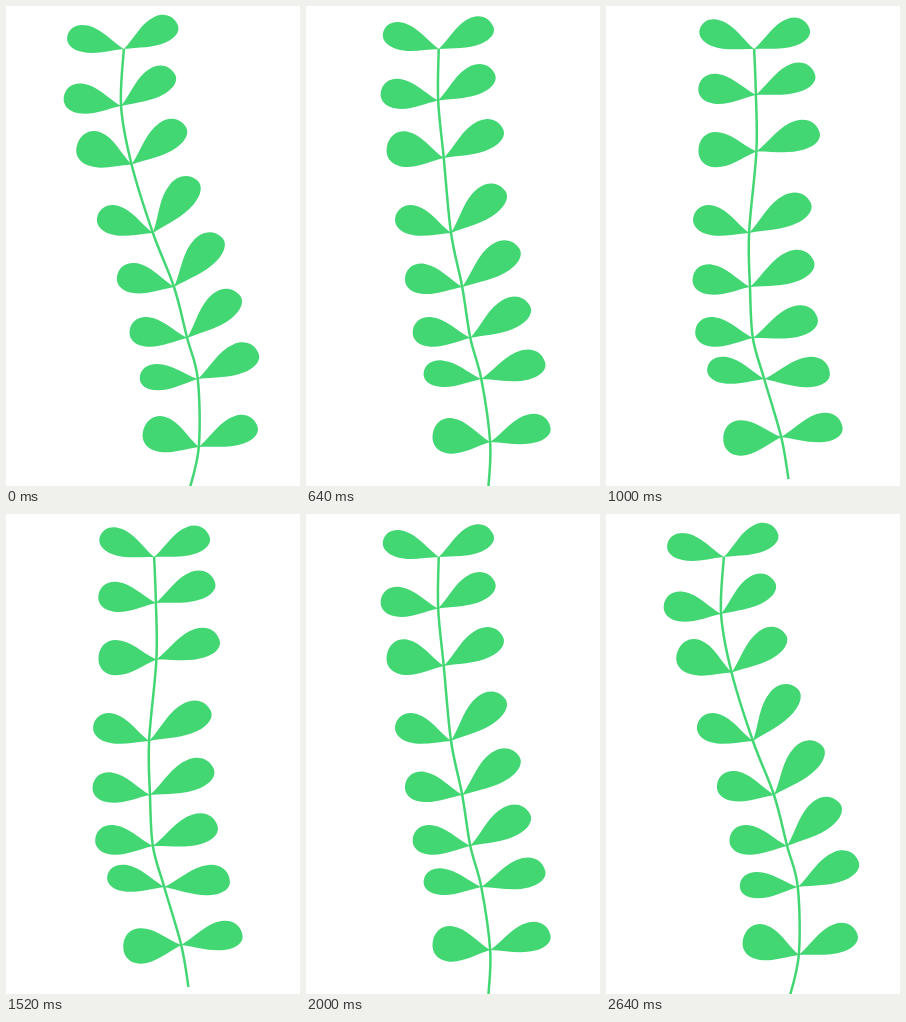
Write an HTML page with a canvas that moves like this. It is 294 px wide and 480 px high and loops after 2.72 s.

```html
<!DOCTYPE html>
<html lang="en">
<head>
<meta charset="utf-8">
<title>Swaying sprig</title>
<style>
  html, body { margin: 0; width: 100%; height: 100%; overflow: hidden; background: #fff; }
  canvas { display: block; }
</style>
</head>
<body>
<canvas id="stage" width="294" height="480"></canvas>
<script>
const ctx = document.getElementById('stage').getContext('2d');
const GREEN = '#43d774';
const WIDTH = 294;
const HEIGHT = 480;
const LOOP = 2720;

// Leaf pairs in the middle of the sway. Angles are degrees above the horizontal;
// fold is how far the left leaf lifts as the sprig leans left.
const PAIRS = [
  { x: 133, y: 43, left: 17, fold: -4, right: 22 },
  { x: 132.5, y: 94.5, left: 8, fold: 1, right: 25 },
  { x: 138, y: 152, left: 11, fold: 10, right: 26 },
  { x: 145, y: 227, left: 17, fold: 0, right: 38 },
  { x: 156, y: 281, left: 10, fold: 1, right: 34 },
  { x: 164, y: 332, left: 7, fold: 0, right: 28 },
  { x: 175, y: 373, left: 6, fold: -5, right: 14 },
  { x: 184, y: 436, left: 7, fold: 10, right: 14 }
];
const BASE = { x: 182.5, y: HEIGHT };

// The sway is held in steps: out to the upright pose, a pause, then back.
const LAST_STEP = 20;
const LONG_HOLDS = { 0: 160, 8: 160, 10: 240, 15: 160 };

function stepAt(time) {
  let step = 0;
  while (step < LAST_STEP) {
    time -= LONG_HOLDS[step] || 120;
    if (time < 0) break;
    step++;
  }
  return step;
}

// -1 leans left, 1 stands upright.
function swayAt(step) {
  const progress = Math.min(1, Math.min(step, LAST_STEP - step) / 8);
  return -Math.cos(Math.PI * progress ** 1.5);
}

const heightOf = ({ y }) => (HEIGHT - y) / 437;

function bendStem(point, sway) {
  const h = heightOf(point);
  const lift = Math.max(0, Math.sin(Math.PI * (h - 0.6) / 0.4));
  return {
    x: point.x - 17.5 * sway * Math.sin(Math.PI * h / 0.6),
    y: point.y - 7 * sway * lift
  };
}

function drawStem(nodes) {
  const at = i => nodes[Math.max(0, Math.min(nodes.length - 1, i))];
  const slope = (i, axis) => (at(i + 1)[axis] - at(i - 1)[axis]) / 6;
  ctx.beginPath();
  ctx.moveTo(nodes[0].x, nodes[0].y);
  for (let i = 0; i < nodes.length - 1; i++) {
    const a = nodes[i];
    const b = nodes[i + 1];
    ctx.bezierCurveTo(a.x + slope(i, 'x'), a.y + slope(i, 'y'),
      b.x - slope(i + 1, 'x'), b.y - slope(i + 1, 'y'), b.x, b.y);
  }
  ctx.stroke();
}

// A teardrop from the node; side is -1 for left and 1 for right.
function drawLeaf(node, side, degrees, length, halfWidth, arch) {
  const top = -halfWidth - arch;
  const bottom = halfWidth - arch;
  ctx.save();
  ctx.translate(node.x, node.y);
  ctx.scale(side, 1);
  ctx.rotate(-degrees * Math.PI / 180);
  ctx.scale(length, 1);
  ctx.beginPath();
  ctx.moveTo(0, 0);
  ctx.bezierCurveTo(0.25, top * 0.35, 0.45, top, 0.7, top);
  ctx.bezierCurveTo(0.88, top, 1, top * 0.6, 1, 0);
  ctx.bezierCurveTo(1, bottom * 0.6, 0.88, bottom, 0.7, bottom);
  ctx.bezierCurveTo(0.45, bottom, 0.25, bottom * 0.4, 0, 0);
  ctx.fill();
  ctx.restore();
}

function drawPair(pair, node, sway) {
  const belly = Math.sin(Math.PI * heightOf(pair));
  const leftWidth = 14.7 + 0.3 * pair.fold;
  drawLeaf(node, -1, pair.left - pair.fold * sway, 58, leftWidth, 1.2);
  drawLeaf(node, 1, pair.right - (2 + 10 * belly) * sway, 59 + 10 * belly, 14 + 1.5 * belly, 3);
}

function draw(time) {
  const sway = swayAt(stepAt(time % LOOP));
  const nodes = [...PAIRS, BASE].map(point => bendStem(point, sway));

  ctx.fillStyle = '#fff';
  ctx.fillRect(0, 0, WIDTH, HEIGHT);
  ctx.fillStyle = ctx.strokeStyle = GREEN;
  ctx.lineWidth = 2.5;
  ctx.lineJoin = 'round';
  drawStem(nodes);
  PAIRS.forEach((pair, i) => drawPair(pair, nodes[i], sway));
}

function tick() {
  draw(performance.now());
  requestAnimationFrame(tick);
}
tick();
</script>
</body>
</html>
```
